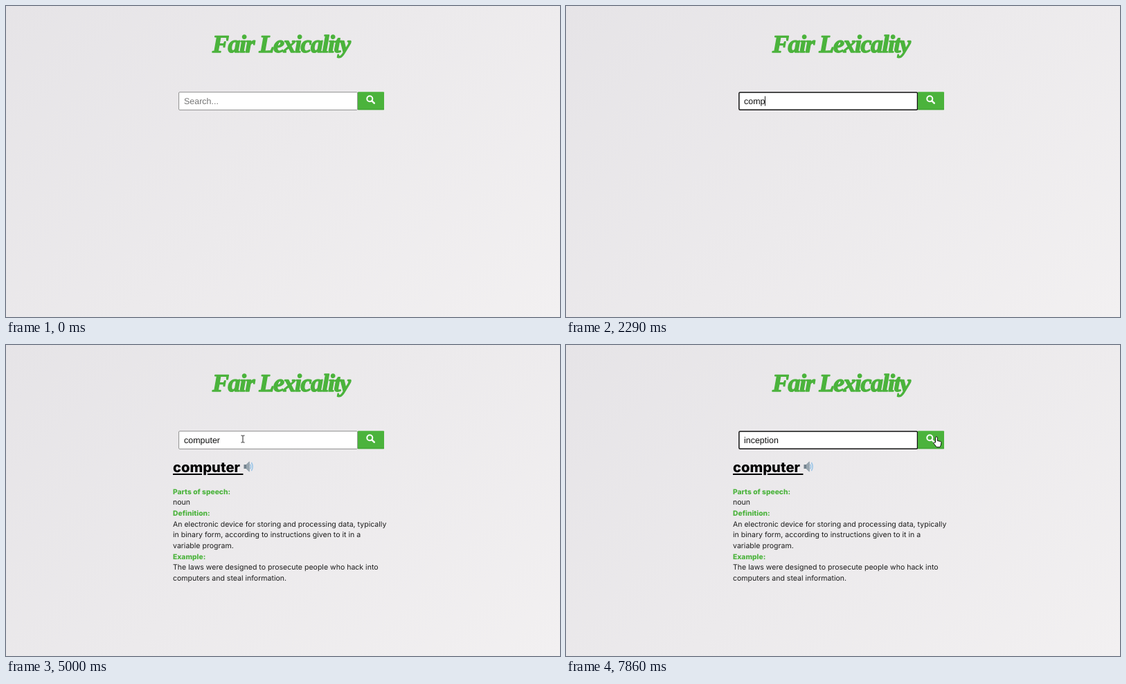
Write an HTML page that moves like this. It is 800x450 px and loops after 8000 ms.

```html
<!DOCTYPE html>
<html lang="en">
<head>
<meta charset="utf-8">
<title>Fair Lexicality</title>
<style>
html, body { margin: 0; width: 100%; height: 100%; overflow: hidden; }
body { background: linear-gradient(135deg, #e6e4e7, #f2f0f1); }
svg { display: block; width: 800px; height: 450px; }
text { text-rendering: geometricPrecision; white-space: pre; }
.title {
  font: italic bold 36px "Liberation Serif", serif; letter-spacing: -1.5px;
  fill: #4bb33c; stroke: #4bb33c; stroke-width: 1.4; stroke-linejoin: round;
}
.field { font: 12.48px "Liberation Sans", sans-serif; fill: #111; }
.hint { fill: #757575; }
.word { font: 800 20.2px Inter, sans-serif; text-decoration: underline; }
.line { font: 10.55px Inter, sans-serif; fill: #1c1c1c; }
.label { font-weight: 800; font-size: 10.3px; fill: #4bb33c; }
</style>
</head>
<body>
<svg viewBox="0 0 800 450">
  <text class="title" x="298" y="67">Fair Lexicality</text>

  <rect id="box" fill="#fff"/>
  <rect x="508" y="124.3" width="38" height="25.9" rx="1" fill="#4bb33c"/>
  <path d="M508 149.5h38" stroke="#43a736" stroke-width="1.4"/>
  <g fill="none" stroke="#fff" stroke-width="2">
    <circle cx="525.3" cy="134.2" r="4"/>
    <path d="M528.4 137.3l3.4 3.4" stroke-width="2.4" stroke-linecap="round"/>
  </g>

  <rect id="mark" y="130" height="15" fill="#0078d7"/>
  <text class="field hint" id="hint" x="257" y="142">Search...</text>
  <text class="field" id="field" x="257" y="142"><tspan id="plain"></tspan><tspan id="picked" fill="#fff"></tspan></text>
  <rect id="caret" y="130.5" width="1" height="14" fill="#222"/>

  <g id="result">
    <text class="word" x="241" y="184">computer </text>
    <path d="M343.5 173h3.5l4.5-4.5v15l-4.5-4.5h-3.5z" fill="#74828d"/>
    <path d="M347 173l4.5-4.5v15l-4.5-4.5z" fill="#98a5af"/>
    <g fill="none" stroke="#9cc6e8" stroke-width="1.5">
      <path d="M352.6 172.5q2 3.5 0 7"/>
      <path d="M354.4 170q3.6 6 0 12"/>
    </g>
  </g>

  <g id="pointer">
    <g id="beam" fill="none">
      <path d="M-2.5-5h2l.5.5.5-.5h2M0-4.5v9M-2.5 5h2l.5-.5.5.5h2" stroke="#222"/>
    </g>
    <path id="hand" d="M-1.5 8V1.2a1.4 1.4 0 0 1 2.8 0V5.5l4.5 1q1.2.4 1.1 2l-.6 3.5-1.3 2.8H.3L-4 9.6q-.6-1.6 1-1.6z" fill="#fff" stroke="#111"/>
    <path id="arrow" d="M.5.5v12l3-3.3 5.5-.2z" fill="#f3f7fd" stroke="#2b3a55"/>
  </g>
</svg>
<script>
const $ = id => document.getElementById(id);
const show = (id, on) => $(id).setAttribute('visibility', on ? 'inherit' : 'hidden');
const set = (id, attrs) => {
  for (const name in attrs) $(id).setAttribute(name, attrs[name]);
};

const LOOP = 8000, LEFT = 257;
const FOCUS = 1000, SEARCH = 3430, RESULT = 3710, DRAG = 5140;
const FIRST = { word: 'computer', keys: [1430, 1710, 2000, 2290, 2430, 2570, 2570, 2710] };
const SECOND = { word: 'inception', keys: [5860, 6140, 6290, 6430, 6570, 6710, 6860, 7000, 7140] };

// Pointer path: time, x, y
const PATH = [
  [140, 440, 176], [710, 364, 141], [2860, 364, 141], [3290, 513, 140],
  [3860, 516, 137], [4140, 516, 137], [5000, 342, 136], [DRAG, 342, 136],
  [5710, 243, 146], [7140, 243, 146], [7290, 400, 235], [7430, 529, 303],
  [7570, 597, 229], [7710, 560, 175], [7860, 535, 133]
];

const LINES = [
  '*Parts of speech:', 'noun', '*Definition:',
  'An electronic device for storing and processing data, typically',
  'in binary form, according to instructions given to it in a',
  'variable program.', '*Example:',
  'The laws were designed to prosecute people who hack into',
  'computers and steal information.'
];

LINES.forEach((line, i) => {
  const el = document.createElementNS('http://www.w3.org/2000/svg', 'text');
  el.textContent = line.replace('*', '');
  el.setAttribute('class', line[0] === '*' ? 'line label' : 'line');
  el.setAttribute('x', 241);
  el.setAttribute('y', 215.7 + i * 15.65);
  $('result').append(el);
});

function hold(t) {
  const start = k => Math.round(k * 100 / 7) * 10;
  const k = Math.round(t * 7 / 1000);
  return start(k) > t ? start(k - 1) : start(k);
}

function pointerAt(t) {
  const i = PATH.findIndex(p => p[0] >= t);
  if (i < 1) return PATH[0].slice(1);
  const [t0, x0, y0] = PATH[i - 1], [t1, x1, y1] = PATH[i];
  const f = (t - t0) / (t1 - t0);
  return [x0 + (x1 - x0) * f, y0 + (y1 - y0) * f];
}

function pointerKind(x, y) {
  if (y > 124 && y < 151 && x > 249 && x < 546) return x < 508 ? 'beam' : 'hand';
  return x > 241 && x < 550 && y > 204 && y < 345 ? 'beam' : 'arrow';
}

function draw(t) {
  const [x, y] = pointerAt(t);
  const { word, keys } = t < SECOND.keys[0] ? FIRST : SECOND;
  const typed = word.slice(0, keys.filter(k => k <= t).length);
  const focused = t >= FOCUS && t < SEARCH || t >= DRAG;
  const selecting = t >= DRAG && t < SECOND.keys[0];

  set('box', focused
    ? { x: 249.9, y: 125, width: 257.6, height: 25.2, rx: 1.5, stroke: '#111', 'stroke-width': 1.5 }
    : { x: 249.6, y: 124.7, width: 258, height: 25.7, rx: 1.2, stroke: '#7c7c7c', 'stroke-width': .85 });
  show('hint', !typed);

  $('plain').textContent = typed;
  $('picked').textContent = '';
  const end = $('field').getComputedTextLength();
  const cut = selecting
    ? Math.max(0, Math.min(typed.length, Math.round((x - LEFT) / end * typed.length)))
    : typed.length;
  $('plain').textContent = typed.slice(0, cut);
  const split = cut ? $('plain').getComputedTextLength() : 0;
  $('picked').textContent = typed.slice(cut);
  set('mark', { x: LEFT + split, width: Math.max(0, end - split) });

  const lastTouch = Math.max(...[FOCUS, DRAG, ...FIRST.keys, ...SECOND.keys].filter(k => k <= t));
  show('caret', focused && cut === typed.length && (t - lastTouch) % 1200 < 600);
  set('caret', { x: Math.round(LEFT + end - .5) });

  show('result', t >= RESULT);
  show('pointer', t >= PATH[0][0] && (t < FIRST.keys[0] || t >= 3000));
  set('pointer', { transform: `translate(${x} ${y})` });
  const kind = pointerKind(x, y);
  for (const id of ['beam', 'hand', 'arrow']) show(id, id === kind);
}

function tick(now) {
  draw(hold(now % LOOP));
  requestAnimationFrame(tick);
}
draw(0);
requestAnimationFrame(tick);
</script>
</body>
</html>
```
